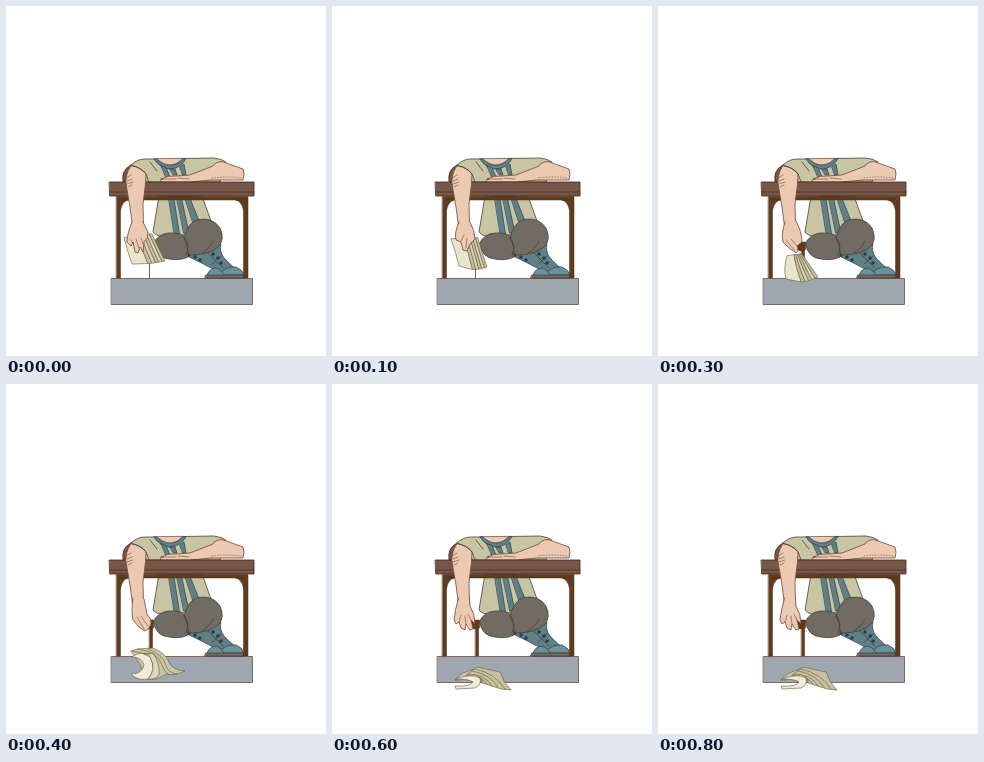
Recreate the animation shown at these times as an HTML page. Size 320x350 px, loop 900 ms.

```html
<!DOCTYPE html>
<html lang="en">
<head>
<meta charset="utf-8">
<title>Asleep at the desk</title>
<style>
  html, body { margin: 0; width: 100%; height: 100%; overflow: hidden; background: #fff; }
  svg { display: block; width: 100vw; height: 100vh; }
  path, rect, ellipse { stroke: #4b4036; stroke-width: .8; stroke-linejoin: round; stroke-linecap: round; }
  .wood { fill: #775747; stroke: #402819; }
  .leg { fill: #603c1d; stroke: #4b2d16; stroke-width: .5; }
  .stone { fill: #9ea7af; stroke: #704c40; }
  .cloth { fill: #c7c5a4; }
  .blue { fill: #608088; stroke: #354950; }
  .shoe { fill: #6a929d; stroke: #354950; }
  .grey { fill: #706c64; }
  .skin { fill: #ecc9b1; stroke: #70483c; }
  .line { fill: none; }
  .crease { fill: none; stroke: #75483b; stroke-width: .6; }
  .dot { fill: #263e4a; stroke: none; }
  #book path { stroke: #665b43; stroke-width: .6; }
</style>
</head>
<body>
<svg viewBox="0 0 320 350">
  <rect class="stone" x="105.5" y="272.5" width="141" height="26"/>

  <!-- seated figure below the desk -->
  <path class="cloth" d="M153 190L147 226Q151 232 168 231L190 226L205 215L196 190Z"/>
  <path class="blue" d="M162.500 190h5l6 38h-5zM170.500 190h4.500l8 37h-5zM178.500 190h4.500l10.500 26-5 5z"/>
  <path class="blue" d="M179 249L206 235L215 238Q213 245 218 252Q226 261 236 267L238 272H201Q202 265 209 264Q196 257 179 249Z"/>
  <path class="shoe" d="M214 268Q219 260 230 261Q237 264 238 269H214Z"/>
  <path class="shoe" d="M201 270Q202 263 210 262Q216 264 218 270Z"/>
  <path class="grey" d="M200 269H238L239 272H199Z"/>
  <path class="line" d="M201 246L212 257L217 262M215 250L206 258"/>
  <g id="dots"></g>
  <path class="grey" d="M147.500 238Q151 228 163 227Q177 226 182 234V251Q174 255 163 253Q150 252 147.500 238Z"/>
  <path class="grey" d="M178 232Q182 216 192 213.500Q207 211 214 222Q219 233 213 240Q205 249 183 249Q183 240 178 232Z"/>
  <path class="line" d="M179 232Q184 241 180 249M196 247Q204 242 207 235"/>

  <!-- desk frame -->
  <path class="leg" d="M110.500 190.500H242V272H237.500V194H114.500V272H110.500Z"/>
  <path class="leg" d="M114.500 194h8q-6 1-8 10zM237.500 194h-8q6 1 8 10z"/>
  <g id="prop">
    <path class="leg" d="M143.500 238h3v34h-3z"/>
    <path class="leg" d="M140 236h7.500v8q-4 2-7.500 0z"/>
  </g>
  <path id="thin" class="line" d="M143.500 250V272"/>

  <!-- torso and resting arm -->
  <path class="wood" d="M117 176Q115 164 125 159L133 161L126 176Z"/>
  <path class="cloth" d="M125 159Q131 153 139 153H150L177 152.500L208 152Q216 153 220 156L214 176H140L137 167Z"/>
  <path class="skin" style="stroke-width:.4" d="M150 153Q163 166 177 152.500Z"/>
  <path class="blue" d="M148 153Q154 163 165 163Q175 162 180 152.500H177Q172 159 164 159Q157 159 151 153Z"/>
  <path class="blue" d="M155 159.500L160 161.500L164 171H160ZM164 163H169L171 169H167.500ZM174 161L178 158L180 169H177Z"/>
  <path class="skin" d="M155 173Q162 169 170 170L184 169L207 160Q209 156 216 155.500L237 163Q239 168 237 174L205 174L184 176H155Q153 174 157 173Z"/>
  <path class="crease" d="M157 173H170M172 172L183 173"/>
  <path class="crease" style="stroke-dasharray:.8 2" d="M206 172Q220 170 235 172"/>

  <path class="wood" d="M103.500 176H248V190H104Z"/>
  <path class="line" style="stroke:#48301f" d="M104 186H248"/>

  <g id="book"></g>

  <!-- hanging arm -->
  <path class="skin" d="M125 159.500Q118 170 120.500 181L124 201L126.500 220H137.500L137 198L139.500 178L140 168Q134 161 125 159.500Z"/>
  <path class="line" d="M125 159.500Q136 161.500 140 168L143 176M144 156L151 165"/>
  <path class="crease" d="M120 172l5-3M121 175l5-2M121 178l6-2M122 181l4-2"/>
  <path id="hand" class="skin"/>
  <path id="fingers" class="crease"/>
</svg>
<script>
const STEP = 100, STEPS = 9;
const el = id => document.getElementById(id);
const mix = (a, b, u) => a.map((v, i) => v + (b[i] - v) * u);

el('dots').innerHTML = [[183, 249], [189, 251], [194, 254], [207, 248], [212, 252], [215, 257]]
  .map(([x, y]) => `<ellipse class="dot" cx="${x}" cy="${y}" rx="1.800" ry="1.800"/>`).join('');

// Left edge, right edge (quadratic curves) and sag of the lower edge
const held = { l: [118, 232, 122, 247, 126, 258], r: [146, 228, 152, 241, 159, 255], sag: 1 };
const slip = { l: [119, 233, 124, 247, 127, 260], r: [146, 232, 150, 247, 155, 261], sag: 3 };
const stand = { l: [129, 250, 125, 262, 128, 273], r: [144, 248, 151, 258, 160, 271], sag: 4 };
const drop = { l: mix(slip.l, stand.l, .5), r: mix(slip.r, stand.r, .5), sag: 4 };
const leaves = [0, .48, .6, .71, .81, .91, 1];

function sheets({ l, r, sag }) {
  const edge = u => {
    const e = mix(l, r, u);
    e[5] += sag * Math.sin(Math.PI * u);
    return e;
  };
  return leaves.slice(1).map((u, i) => {
    const a = edge(leaves[i]), b = edge(u);
    const fill = i ? ['#d9d3b4', '#c6bf9d'][i % 2] : '#e9e5cd';
    return shape(fill, `M${a[0]} ${a[1]}Q${a.slice(2)}L${b[4]} ${b[5]}Q${b[2]} ${b[3]} ${b[0]} ${b[1]}Z`);
  }).join('');
}

function shape(fill, d) {
  return `<path fill="${fill}" d="${d}"/>`;
}

const fan =
  shape('#cbc4a2', 'M125 267L131 265L147 264Q160 269 164 280Q169 287 179 287Q170 292 160 290Q151 297 140 295L134 280Z') +
  shape('#efebd8', 'M126 273Q136 265 144 273Q151 285 142 295Q131 297 125 290Q136 290 138 281Q136 273 126 273Z') +
  shape('#ddd7b9', 'M144 273Q151 285 142 295Q149 296 153 291Q154 279 147 269L138 270Z') +
  shape('none', 'M132 265Q152 268 156 281Q158 288 163 291M142 265Q158 271 161 284Q165 290 172 290M126 267L144 271');
const landing =
  shape('#cfc8a7', 'M124 292L132 282L147 280L155 287L146 290L128 292Z') +
  shape('#b5aa86', 'M144 286L155 287L182 297L178 303L158 295Z') +
  shape('#d5ceb0', 'M138 290Q146 285 155 291L179 301L178 303L156 297Q158 303 146 304Z') +
  shape('#efebd8', 'M124 292Q141 287 147 293Q151 300 143 304Q132 306 127 301Q139 303 139 297Q135 293 124 292Z') +
  shape('none', 'M131 283L146 287M137 282L151 288M154 291L180 300');
const landed =
  shape('#cfc8a7', 'M123 296L131 289L145 284L151 292L136 295Z') +
  shape('#c9c09d', 'M134 291L145 283L168 288Q171 298 179 306Q169 306 160 302L150 299Q151 294 146 293Z') +
  shape('#efebd8', 'M124 295Q140 289 148 294Q150 301 143 304L124 305L123 302Q138 303 141 298Q137 295 124 295Z') +
  shape('none', 'M136 290Q153 290 160 302M140 287Q158 290 166 303M143 285Q163 289 173 305M148 294Q153 297 155 300');

const grip = ['M126 216Q121 228 121 236L125 240L127 236L129 246L132 247L134 241L137 246L138 236Q143 232 142 226L137 216',
  'M125 234L127 238M130 233L133 242M135 232L137 238'];
const loosen = ['M127 216Q122 227 124 234L129 236L131 244L135 245L138 238L143 233Q143 225 138 216',
  'M129 235L132 229M134 242L135 232'];
const open = ['M127 216Q123 228 125 236Q131 243 138 247Q141 245 139 240L144 236Q144 226 138 215',
  'M128 234L137 245M133 233L139 240'];
const limp = ['M127 214Q125 226 127 236L134 244L139 247Q143 246 145 240Q146 235 141 230L138 215',
  'M131 233L138 245M135 232L142 242'];
const rest = ['M127 214Q123 226 124 236L128 243L130 241L134 246L139 247L140 243L145 241Q146 232 139 225L137.500 215',
  'M129 232L130 241M133 232L138 244M137 232L141 240'];
const spread = ['M126.500 214Q123 226 122 236L124 240L127 238L129 244L133 246L134 240L138 246L141 245L139 236L143 240Q143 230 138 222L137.500 214',
  'M127 238L129 231M134 240L133 232M139 236L136 230'];
const books = [...[held, slip, drop, stand].map(sheets), fan, landing, landed, landed, landed];
const hands = [grip, loosen, open, open, limp, rest, spread, spread, spread];

let shown = -1;
function draw(ms) {
  const n = Math.floor(ms / STEP) % STEPS;
  if (n === shown) return;
  shown = n;
  el('book').innerHTML = books[n];
  el('hand').setAttribute('d', hands[n][0]);
  el('fingers').setAttribute('d', hands[n][1]);
  el('prop').style.display = n < 2 ? 'none' : '';
  el('thin').style.display = n < 2 ? '' : 'none';
}

const start = performance.now();
function tick() {
  draw(performance.now() - start);
  requestAnimationFrame(tick);
}
draw(0);
requestAnimationFrame(tick);
</script>
</body>
</html>
```
